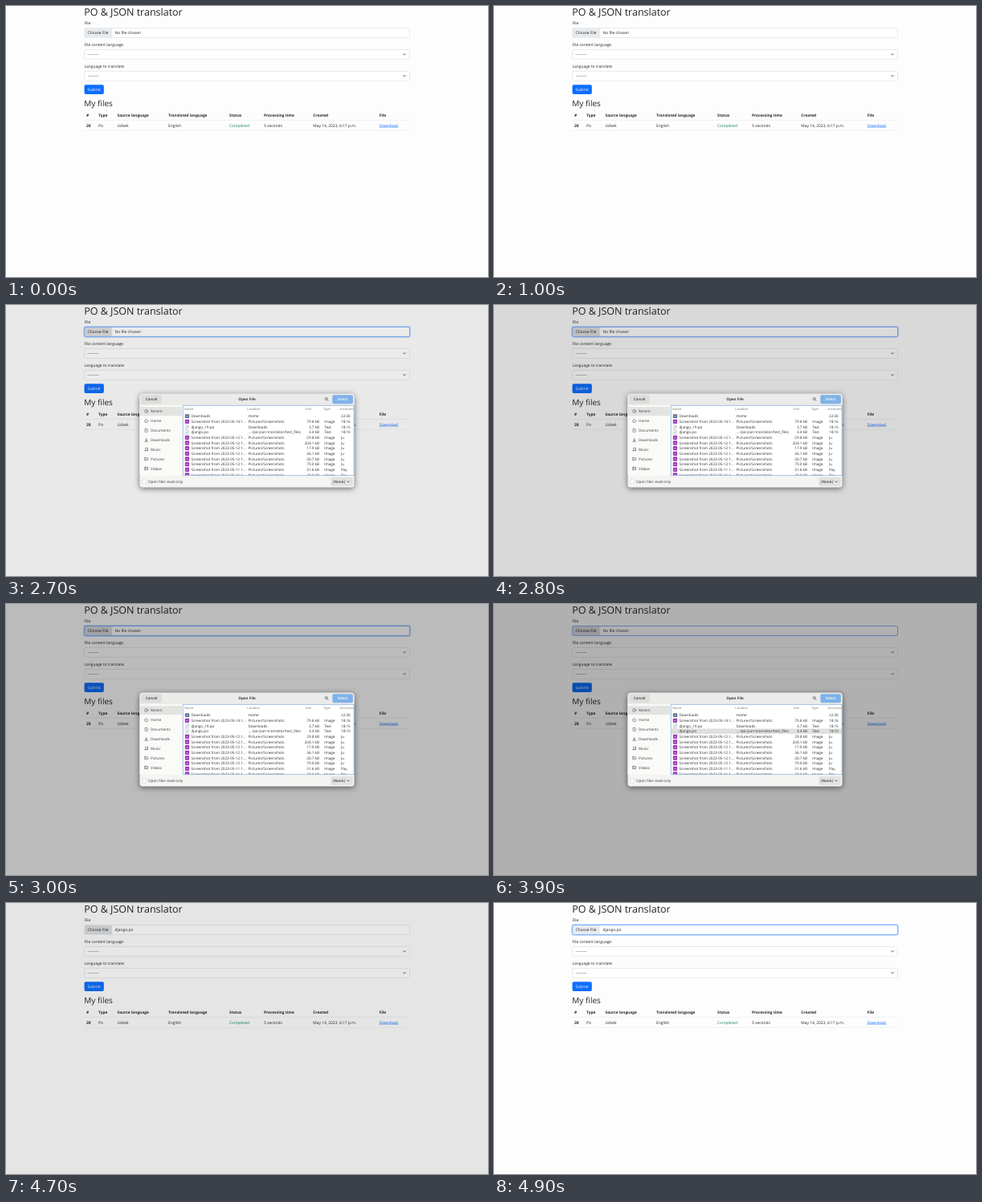
Recreate the animation shown at these times as an HTML page with a canvas. Size 600x338 px, loop 5000 ms.

```html
<!DOCTYPE html>
<html lang="en">
<head>
<meta charset="utf-8">
<title>PO &amp; JSON translator</title>
<style>
  html, body { margin: 0; height: 100%; overflow: hidden; background: #fdfdfd; }
  canvas { display: block; width: 600px; height: 338px; }
</style>
</head>
<body>
<canvas id="stage" width="600" height="338"></canvas>
<script>
const LOOP = 5000, STEP = 100;
const INK = '#212529', LINE = '#ced4da', BLUE = '#0d6efd';
const ctx = document.getElementById('stage').getContext('2d');
ctx.textRendering = 'geometricPrecision';
ctx.lineCap = 'round';

const ramp = (t, from, to) => Math.min(1, Math.max(0, (t - from) / (to - from)));
const outQuad = p => 1 - (1 - p) ** 2;

// y is the middle of the lowercase line
function text(str, x, y, { size = 4.9, weight = 400, color = INK, align = 'left' } = {}) {
  ctx.font = `${weight} ${size}px "Open Sans", sans-serif`;
  ctx.fillStyle = color;
  ctx.textAlign = align;
  ctx.fillText(str, x, y + size * 0.35);
}

function box(x, y, w, h, r, fill, stroke, width = 0.5) {
  ctx.beginPath();
  ctx.roundRect(x, y, w, h, r);
  if (fill) { ctx.fillStyle = fill; ctx.fill(); }
  if (stroke) { ctx.strokeStyle = stroke; ctx.lineWidth = width; ctx.stroke(); }
}

function path(points, color, width = 0.6) {
  ctx.beginPath();
  points.forEach(([x, y]) => ctx.lineTo(x, y));
  ctx.strokeStyle = color;
  ctx.lineWidth = width;
  ctx.stroke();
}

function circle(x, y, r, color, width = 0.6) {
  ctx.beginPath();
  ctx.arc(x, y, r, 0, 7);
  ctx.strokeStyle = color;
  ctx.lineWidth = width;
  ctx.stroke();
}

const chevron = (x, y, color, s = 1.6) =>
  path([[x - s, y - s / 2], [x, y + s / 2], [x + s, y - s / 2]], color, 0.7);

function select(label, y) {
  text(label, 97.5, y);
  box(97.7, y + 6.4, 404.8, 11.8, 1.9, '#fff', LINE);
  text('---------', 101.5, y + 12.2);
  chevron(496, y + 12.3, '#343a40');
}

function fileInput(t) {
  const hover = ramp(t, 1550, 1700) * (1 - ramp(t, 4700, 4850));
  const back = ramp(t, 4700, 4850);
  const focus = ramp(t, 2350, 2500) * (1 - ramp(t, 4250, 4500)) + back;
  const halo = ramp(t, 2350, 2500) * (1 - ramp(t, 3550, 3900)) + back;
  const mix = (a, b, p) => a + (b - a) * p;

  text('File', 97.5, 21.4);
  if (halo) box(97, 26.9, 406.1, 13.1, 2.5, null, `rgba(13,110,253,${0.3 * halo})`, 1.4);
  box(97.7, 27.5, 404.8, 11.9, 1.9, '#fff', LINE);
  box(98, 27.8, 33.3, 11.3, [1.7, 0, 0, 1.7],
    `rgb(${mix(233, 221, hover)},${mix(236, 222, hover)},${mix(239, 224, hover)})`);
  path([[131.5, 27.8], [131.5, 39.1]], LINE, 0.4);
  if (focus) box(97.7, 27.5, 404.8, 11.9, 1.9, null, `rgba(110,168,254,${focus})`, 0.8);
  text('Choose File', 101.5, 33.5);
  text(t >= 4500 ? 'django.po' : 'No file chosen', 135.5, 33.5);
}

const COLUMNS = [
  [100, '#', '20'], [115, 'Type', 'Po'], [138.5, 'Source language', 'Uzbek'],
  [202, 'Translated language', 'English'], [278, 'Status', 'Completed'],
  [321, 'Processing time', '5 seconds'], [382.3, 'Created', 'May 14, 2023, 6:17 p.m.'],
  [464.7, 'File', 'Download']
];

function table(t) {
  if (t >= 4500 && t < 4700) box(97.5, 142.3, 405, 12.8, 0, 'rgba(0,0,0,.075)');
  for (const y of [142.4, 155.2]) path([[97.5, y], [502.5, y]], '#d9dde1', 0.4);
  const colors = { Completed: '#198754', Download: BLUE };
  for (const [x, head, value] of COLUMNS) {
    text(head, x, 135.9, { weight: 700, size: 4.8 });
    text(value, x, 148.8, { weight: head === '#' ? 700 : 400, color: colors[value] || INK });
  }
  path([[464.9, 151.3], [488.2, 151.3]], BLUE, 0.4);
}

function page(t) {
  ctx.fillStyle = '#fdfdfd';
  ctx.fillRect(0, 0, 600, 338);
  text('PO & JSON translator', 97.2, 7.6, { size: 12.5, weight: 500 });
  fileInput(t);
  select('File content language', 48.1);
  select('Language to translate', 75);
  box(97.5, 98.2, 24.3, 11.8, 1.9, BLUE);
  text('Submit', 101.5, 104.1, { color: '#fff' });
  text('My files', 97.3, 121.4, { size: 10, weight: 500 });
  table(t);

  if (t >= 2200 && t < 2400) {
    ctx.save();
    ctx.shadowColor = 'rgba(0,0,0,.3)';
    ctx.shadowBlur = 2;
    box(142, 37.3, 35.8, 7.6, 1, '#f8f8f8', '#888');
    ctx.restore();
    text('No file chosen', 145, 41.1, { size: 4.4, color: '#444' });
  }
}

const PLACES = ['Recent', 'Home', 'Documents', 'Downloads', 'Music', 'Pictures', 'Videos'];
const shot = (day, size, when) =>
  ['shot', `Screenshot from 2023-05-${day} 1...`, 'Pictures/Screenshots', size + ' kB', 'Image', when];
const FILES = [
  ['folder', 'Downloads', 'Home', '', '', '22:30'],
  shot(14, '79.8', '18:16'),
  ['doc', 'django_19.po', 'Downloads', '3.7 kB', 'Text', '18:15'],
  ['doc', 'django.po', '… /po-json-translator/test_files', '3.4 kB', 'Text', '18:10'],
  ...['29.8', '204.1', '17.9', '36.1', '30.7', '79.0'].map(size => shot(12, size, 'Ju')),
  shot(11, '31.6', 'Pay'),
  shot(11, '20.0', 'Pay')
];

function fileIcon(kind, y) {
  if (kind === 'shot') {
    box(222.8, y - 2.6, 5.3, 5.3, 1, '#9b38b8');
    path([[224.3, y + 1], [225.3, y - 0.6], [226.6, y + 1]], '#f0d8f6', 0.6);
  } else if (kind === 'folder') {
    box(222.8, y - 2.4, 5.3, 4.8, 0.7, '#5d6f85');
    box(224.4, y - 0.8, 2.1, 1.8, 0.3, '#a9c4e6');
  } else {
    box(223.3, y - 2.6, 4.4, 5.3, 0.6, '#f1f3f5', '#b5bbc2', 0.4);
    path([[224.4, y + 1.2], [226.6, y - 0.8]], '#5f9ec9', 0.7);
  }
}

function placeIcon(i, y) {
  const c = '#555', x = 174.6;
  switch (i) {
    case 0: circle(x, y, 2.1, c, 0.5); path([[x, y - 1.2], [x, y], [x + 1, y]], c, 0.5); break;
    case 1: path([[x - 2.2, y], [x, y - 2.1], [x + 2.2, y]], c);
            path([[x - 1.5, y], [x - 1.5, y + 2], [x + 1.5, y + 2], [x + 1.5, y]], c, 0.5); break;
    case 2: box(x - 1.7, y - 2.1, 3.4, 4.2, 0.5, null, c);
            path([[x - 0.7, y], [x + 0.7, y]], c, 0.5); break;
    case 3: path([[x, y - 2], [x, y + 0.8]], c); chevron(x, y + 0.5, c, 1.2);
            path([[x - 2, y + 2], [x + 2, y + 2]], c); break;
    case 4: path([[x - 0.8, y + 1.5], [x - 0.8, y - 1.8], [x + 1.8, y - 2], [x + 1.8, y + 1]], c);
            circle(x - 1.3, y + 1.5, 0.5, c); circle(x + 1.3, y + 1.1, 0.5, c); break;
    case 5: box(x - 2.1, y - 1.7, 4.2, 3.4, 0.5, null, c);
            path([[x - 1.5, y + 1], [x - 0.3, y - 0.4], [x + 1.5, y + 1]], c, 0.5); break;
    default: box(x - 2.1, y - 1.7, 4.2, 3.4, 0.5, null, c);
            path([[x - 1, y - 1.6], [x - 1, y + 1.6]], c, 0.5);
            path([[x + 1, y - 1.6], [x + 1, y + 1.6]], c, 0.5);
  }
}

function fileList(t) {
  box(220.6, 125.5, 212.4, 87.2, 0, '#fff');
  ctx.save();
  ctx.beginPath();
  ctx.rect(220.6, 125, 212.4, 87.5);
  ctx.clip();
  const heads = [[222, 'Name'], [300.3, 'Location'], [372.6, 'Size'], [395, 'Type'], [415.6, 'Accessed']];
  for (const [x, name] of heads) text(name, x, 129.6, { size: 4, weight: 500, color: '#777' });
  FILES.forEach(([kind, name, place, size, type, when], i) => {
    const y = 138.6 + i * 6.67, style = { size: 4.6, color: '#2e2e2e' };
    if (i === 3 && t >= 3700) box(220.6, y - 3.2, 212.4, 6.6, 0, '#dfdfde');
    fileIcon(kind, y);
    text(name, 230.5, y, style);
    text(place, 301.5, y, style);
    text(size, 390, y, { ...style, align: 'right' });
    text(type, 396.2, y, style);
    text(when, 417, y, style);
  });
  ctx.restore();
  box(220.7, 125.4, 212.4, 87.2, 0, null, '#6a9fd8', 0.6);
}

function dialog(t) {
  const scale = outQuad(ramp(t, 2520, 2620)) * (1 - outQuad(ramp(t, 4518, 4600 + 18)));
  if (scale < 0.002) return;
  const label = { size: 4.6, color: '#3d3d3d' }, strong = { ...label, weight: 600 };
  ctx.save();
  ctx.translate(0, 169.8);
  ctx.scale(1, scale);
  ctx.translate(0, -169.8);

  ctx.save();
  ctx.shadowColor = 'rgba(0,0,0,.55)';
  ctx.shadowBlur = 7;
  ctx.shadowOffsetY = 1.5 * scale;
  box(166.5, 110.8, 267, 116.8, 4, '#f4f4f3');
  ctx.restore();

  box(166.5, 110.8, 267, 14.4, [4, 4, 0, 0], '#ebebea');
  box(168.3, 112.2, 25.4, 11, 2, '#dcdcdb');
  text('Cancel', 181, 117.6, { ...strong, align: 'center' });
  text('Open File', 300, 117.6, { ...strong, weight: 700, align: 'center' });
  circle(398.6, 117, 1.5, '#444');
  path([[399.8, 118.2], [401, 119.4]], '#444', 0.7);
  box(406.3, 112.2, 25.6, 11, 2, '#7fb2e8');
  text('Select', 419.1, 117.6, { ...strong, color: '#fff', align: 'center' });

  box(166.5, 125.2, 54, 87.6, 0, '#fafaf9');
  box(166.5, 127, 52.6, 11.2, 1, '#e3e3e2');
  PLACES.forEach((name, i) => {
    const y = 132.6 + i * 11.9;
    placeIcon(i, y);
    text(name, 180, y, label);
  });
  fileList(t);

  box(169.7, 217.8, 5, 5, 1, '#fff', '#c4c4c4');
  text('Open files read-only', 177, 220.2, label);
  box(404, 215, 27.8, 11, 2, '#e2e2e1');
  text('(None)', 407, 220.3, strong);
  chevron(426, 220.5, '#444', 1.3);
  ctx.restore();
}

function frame(now) {
  const t = Math.floor(now % LOOP / STEP) * STEP;
  page(t);
  const dim = 0.305 * ramp(t, 2570, 3070) * (1 - ramp(t, 4528, 4778));
  ctx.fillStyle = `rgba(0,0,0,${dim})`;
  ctx.fillRect(0, 0, 600, 338);
  dialog(t);
  requestAnimationFrame(() => frame(performance.now()));
}
frame(performance.now());
</script>
</body>
</html>
```
